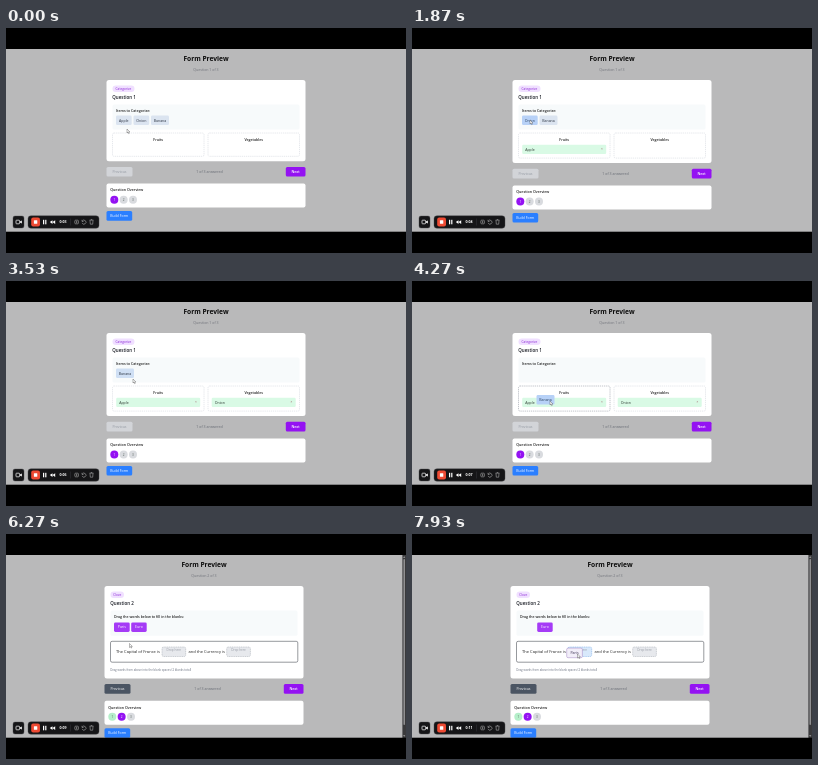
An HTML page that plays this animation: 400x225 px, repeating every 8 s.

```html
<!DOCTYPE html>
<html lang="en">
<head>
<meta charset="utf-8">
<title>Form Preview</title>
<style>
  html, body { margin: 0; width: 100%; height: 100%; overflow: hidden; background: #000; }
  svg { display: block; width: 100vw; height: 100vh; font-family: "Open Sans", "Noto Sans", sans-serif; }
</style>
</head>
<body>
<svg id="stage" viewBox="0 0 400 225"></svg>
<script>
const LOOP = 8000;
const NEXT_PAGE = 5680;
const PURPLE = '#9412f2';
const stage = document.getElementById('stage');

// Pointer stops: time, x, y
const STOPS = [
  [0, 121, 101], [70, 121, 101], [420, 120, 94], [730, 120, 94],
  [1200, 146, 120], [1350, 146, 120], [1780, 118, 92], [1950, 118, 92],
  [2800, 240, 119], [3000, 240, 119], [3480, 127, 98], [3600, 127, 98],
  [3800, 123.5, 93.5], [4200, 138, 120], [4450, 138, 120],
  [5000, 297, 150], [5720, 297, 150], [6230, 123.5, 109.5], [6300, 123.5, 109.5],
  [6600, 118.8, 94.3], [6870, 118.8, 94.3], [7560, 165, 119.5], [7930, 165.5, 120]
];

const ITEMS = [
  { name: 'Apple', width: 15.7, grab: 730, drop: 1270, zone: 0 },
  { name: 'Onion', width: 15.7, grab: 1830, drop: 2930, zone: 1 },
  { name: 'Banana', width: 18, grab: 3800, drop: 4430, zone: 0 }
];
const ZONES = [{ name: 'Fruits', x: 106.5 }, { name: 'Vegetables', x: 202 }];
const PARIS_GRAB = 6870;

function rect(x, y, w, h, fill, r = 0, extra = '') {
  return `<rect x="${x}" y="${y}" width="${w}" height="${h}" rx="${r}" fill="${fill}" ${extra}/>`;
}

// y is the optical middle of the line
function text(str, x, y, { size = 3.55, fill = '#222', weight = 400, anchor = 'start' } = {}) {
  return `<text x="${x}" y="${y + size * 0.35}" font-size="${size}" fill="${fill}" font-weight="${weight}" text-anchor="${anchor}">${str}</text>`;
}

const middle = (str, x, y, style) => text(str, x, y, { ...style, anchor: 'middle' });
const path = (d, fill, extra = '') => `<path d="${d}" fill="${fill}" ${extra}/>`;

function chip(str, x, y, w, fill, color, extra = '') {
  return rect(x, y - 4.8, w, 9.6, fill, 1.4, extra) + middle(str, x + w / 2, y, { fill: color });
}

function button(str, x, y, w, fill, color = '#fff', weight = 500) {
  return rect(x, y - 4.8, w, 9.6, fill, 1.5) + middle(str, x + w / 2, y, { fill: color, weight });
}

function pointerAt(t) {
  const i = STOPS.findIndex(s => s[0] > t);
  if (i < 0) return STOPS.at(-1).slice(1);
  const [t0, x0, y0] = STOPS[i - 1], [t1, x1, y1] = STOPS[i];
  const p = (t - t0) / (t1 - t0), k = p * p * (3 - 2 * p);
  return [x0 + (x1 - x0) * k, y0 + (y1 - y0) * k];
}

// Chip position while held: it keeps the offset it had when grabbed
function dragged(t, grab, x, y) {
  const from = pointerAt(grab), now = pointerAt(t);
  return [x + now[0] - from[0], y + now[1] - from[1]];
}

function heading(page, pill, pillWidth, left) {
  return middle('Form Preview', left + 99.5, 30.9, { size: 6.67, weight: 700, fill: '#0d0d0d' }) +
    middle(`Question ${page} of 3`, left + 99.5, 41.9, { fill: '#70727a' }) +
    rect(left + 6, 57.5, pillWidth, 6.6, '#f0e0ff', 3.3) +
    middle(pill, left + 6 + pillWidth / 2, 60.8, { size: 3.2, weight: 500, fill: '#8a25d5' }) +
    text(`Question ${page}`, left + 5.8, 69.4, { size: 4.5, weight: 600, fill: '#1a1d25' });
}

function footer(page, left, shift, hover) {
  const first = page === 1;
  let out = button('Previous', left, 143.8 + shift, 26, first ? '#d2d4d8' : '#4b5563', first ? '#959aa3' : '#fff') +
    middle('1 of 3 answered', left + 103, 143.8 + shift, { fill: '#666a73' }) +
    button('Next', left + 179.3, 143.8 + shift, 19.7, hover ? '#7d14cc' : PURPLE, '#fff', 600) +
    rect(left, 155.6 + shift, 199, 24, '#fff', 2) +
    text('Question Overview', left + 3.7, 162.2 + shift, { size: 3.62, weight: 600 });
  for (let n = 1; n <= 3; n++) {
    const x = left + 7.8 + (n - 1) * 9.35, y = 171.7 + shift;
    const fill = n === page ? PURPLE : n < page ? '#b5efca' : '#d9dbdf';
    out += `<circle cx="${x}" cy="${y}" r="4" fill="${fill}"/>` +
      middle(n, x, y, { size: 3.1, fill: n === page ? '#fff' : '#53605a' });
  }
  return out + button('Build Form', left, 187.9 + shift, 25.7, '#2b7fff');
}

function sortingPage(t) {
  const left = 100.5;
  const waiting = ITEMS.filter(item => t < item.drop);
  const placed = ZONES.map((_, z) => ITEMS.filter(item => item.zone === z && t >= item.drop));
  const most = Math.max(...placed.map(list => list.length));
  const boxHeight = waiting.length ? 25 : 15;
  const zoneTop = 80 + boxHeight;
  const zoneHeight = [23.3, 25.1, 37][most];
  const bottom = zoneTop + zoneHeight + 5;
  const [px, py] = pointerAt(t);

  let out = rect(left, 52, 199, bottom - 52, '#fff', 2.5) + heading(1, 'Categorize', 22, left) +
    rect(left + 6, 76.5, 187, boxHeight, '#f7fafb', 1.6) +
    text('Items to Categorize:', 110, 83, { weight: 600 });

  let ghost = '', x = 110, holding = false;
  for (const item of waiting) {
    if (t >= item.grab) {
      holding = true;
      const [gx, gy] = dragged(t, item.grab, x, 92.3);
      ghost = chip(item.name, gx, gy, item.width, '#b7d1f7', '#29405f');
    } else {
      const over = px > x && px < x + item.width && py > 87 && py < 99;
      out += chip(item.name, x, 92.3, item.width, over ? '#cfdff4' : '#dbe4f0', '#2b3442');
    }
    x += item.width + 1.8;
  }

  ZONES.forEach((zone, z) => {
    const over = holding && px > zone.x && px < zone.x + 91.5 && py > zoneTop;
    out += rect(zone.x, zoneTop, 91.5, zoneHeight, '#fff', 1.5,
        `stroke="${over ? '#858b96' : '#cdd1d8'}" stroke-width=".5" stroke-dasharray="1.3 .8"`) +
      middle(zone.name, zone.x + 45.7, zoneTop + 6.6, { weight: 600 });
    placed[z].forEach((item, row) => {
      const y = zoneTop + 16.3 + row * 11.4;
      out += rect(zone.x + 3.7, y - 4.6, 84, 9.2, '#d9fae5', 1.2) +
        text(item.name, zone.x + 6.7, y, { fill: '#29362e' }) +
        middle('×', zone.x + 83.5, y, { size: 3.1, fill: '#a0616a' });
    });
  });
  const overNext = px > 280 && py > 140;
  return out + footer(1, left, bottom - 133.3, overNext) + ghost;
}

function blankPage(t) {
  const left = 98.5;
  const [px, py] = pointerAt(t);
  const holding = t >= PARIS_GRAB;
  let out = rect(left, 52, 199, 92.4, '#fff', 2.5) + heading(2, 'Cloze', 13.5, left) +
    rect(left + 6, 76.5, 187, 25.3, '#f7fafb', 1.6) +
    text('Drag the words below to fill in the blanks:', 108, 83, { size: 3.5, weight: 600 });
  if (!holding) out += chip('Paris', 108, 93.2, 15.7, '#a53bf6', '#fff');
  out += chip('Euro', 125.2, 93.2, 15.5, '#a53bf6', '#fff') +
    rect(left + 6, 107.3, 187.3, 20.9, '#fff', 1.6, 'stroke="#50545c" stroke-width=".6"') +
    text('The Capital of France is', 110, 117.9, { size: 4.08 }) +
    text('and the Currency is', 182.5, 117.9, { size: 4.06 });
  for (const x of [156, 220.7]) {
    const over = holding && px > x && px < x + 23.7 && py > 113;
    out += rect(x, 113, 23.7, 9.5, over ? '#d8e9fb' : '#e7e9ed', 1.5,
        `stroke="${over ? '#72a6e4' : '#a3a8b1'}" stroke-width=".5" stroke-dasharray="1.2 .6"`) +
      middle('Drop here', x + 11.8, 115.9, { size: 3.1, fill: '#989da6' });
  }
  out += text('Drag words from above into the blank spaces (2 blanks total)', 104.3, 136.3, { size: 2.89, fill: '#6b7280' }) +
    footer(2, left, 11.1, px > 278 && py > 149);
  if (holding) {
    const [x, y] = dragged(t, PARIS_GRAB, 108, 93.2);
    out += chip('Paris', x, y, 15.7, '#f2eef9', '#33284a', 'stroke="#8d6bb5" stroke-width=".4"');
  }
  return out + rect(396.4, 21, 3.6, 183, '#3a3a3c') + rect(397.5, 25, 1.4, 166, '#9a9a9c', 0.7) +
    path('M397.1 23.8l1.1-1.5 1.1 1.5zM397.1 201.2l1.1 1.5 1.1-1.5z', '#aaa');
}

function recorder(t) {
  const seconds = Math.floor((t + 3080) / 1000);
  const line = 'stroke="#aaa" stroke-width=".6"';
  return rect(7, 188, 11, 12, '#151517', 2, 'stroke="#4c4c50" stroke-width=".4"') +
    rect(10, 192.2, 3.6, 3.6, 'none', 0.6, 'stroke="#fff" stroke-width=".7"') +
    path('M14 193.6l1.8-1v2.8l-1.8-1z', '#fff') +
    rect(22, 187.7, 71, 12.6, '#151517', 3, 'stroke="#4c4c50" stroke-width=".4"') +
    rect(25.2, 189.6, 8.8, 8.8, '#ee4a33', 2) + rect(27.9, 192.3, 3.4, 3.4, '#fff', 0.5) +
    rect(37, 191.8, 1.2, 4.5, '#fff') + rect(39.2, 191.8, 1.2, 4.5, '#fff') +
    path('M46.5 192.2v3.8l-2.7-1.9zM49.2 192.2v3.8l-2.7-1.9z', '#fff') +
    middle(`0:${String(seconds).padStart(2, '0')}`, 57, 194, { size: 3.6, fill: '#fff', weight: 700 }) +
    rect(64.4, 190.5, 0.3, 7, '#4c4c50') +
    rect(68.8, 192.2, 3.6, 3.6, 'none', 0.8, line) + rect(70, 193.4, 1.2, 1.2, '#aaa') +
    path('M76.2 193.2a2 2 0 1 1-.1 1.7M76 191.8v1.6h1.6', 'none', line) +
    path('M83.5 192.2h4M84 192.4l.3 3.8h2.4l.3-3.8M84.8 191.5h1.4', 'none', line);
}

function pointer(t) {
  const [x, y] = pointerAt(t);
  return path(`M${x} ${y}v4l.95-.85.65 1.45.65-.3-.65-1.4h1.25z`, '#fff', 'stroke="#333" stroke-width=".35"');
}

function frame() {
  const t = performance.now() % LOOP;
  stage.innerHTML = rect(0, 21, 400, 183, '#b9b9ba') +
    (t < NEXT_PAGE ? sortingPage(t) : blankPage(t)) +
    rect(0, 203.7, 400, 21.3, '#000') + recorder(t) + pointer(t);
  requestAnimationFrame(frame);
}
frame();
</script>
</body>
</html>
```
